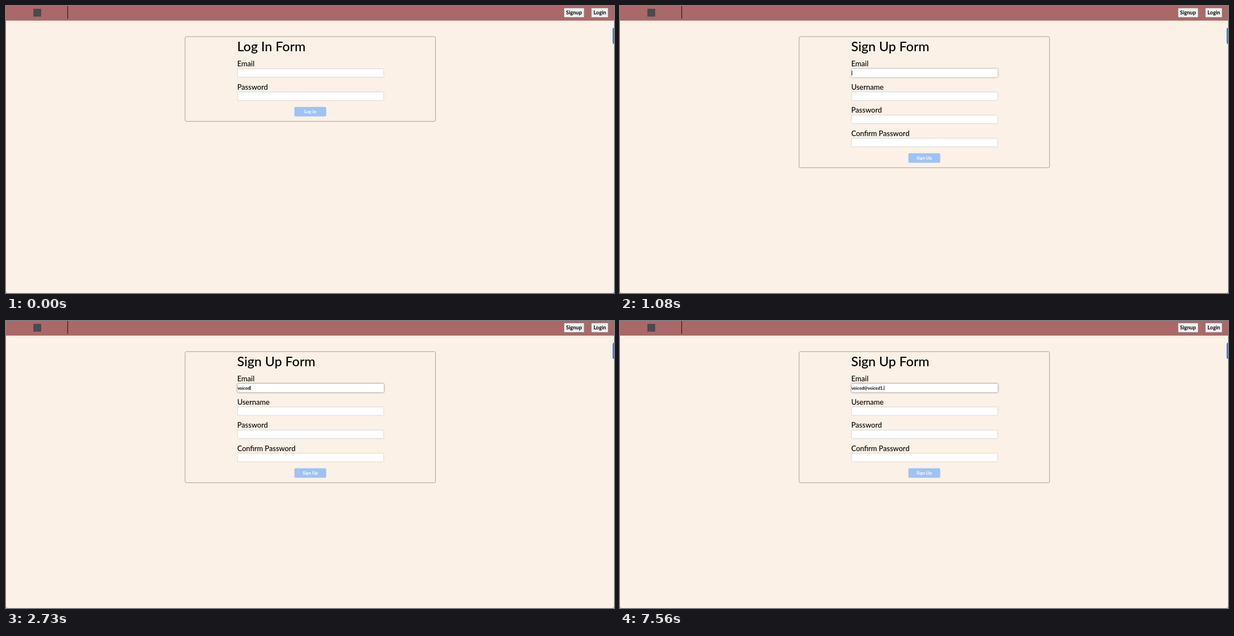
Write an HTML page that moves like this. It is 1089 px wide and 514 px high and loops after 8 s.

```html
<!DOCTYPE html>
<html lang="en">
<head>
<meta charset="utf-8">
<title>Sign up form</title>
<style>
  html, body { margin: 0; width: 100%; height: 100%; overflow: hidden; background: #fbf1e6; }
  svg { display: block; width: 1089px; height: 514px; font-family: Lato, sans-serif; }
  .title { font-size: 23.6px; font-weight: 500; }
  .label { font-size: 13px; font-weight: 500; }
  .nav { font-size: 9.4px; font-weight: 700; text-anchor: middle; }
  .submit { font-size: 8px; font-weight: 700; text-anchor: middle; fill: #fff; }
  .typed { font-size: 7.7px; font-weight: 700; }
  .item { font: 500 7.2px Inter, sans-serif; fill: #222; }
  .navbox { fill: #efefef; stroke: #8c7779; }
  .hover { fill: #dedede; }
  .field { fill: #fff; stroke: #dcd7d1; }
  .box { fill: none; stroke: #a59e97; }
  #focus { filter: drop-shadow(0 0 1.7px rgba(0, 0, 0, .6)); }
  #popup { filter: drop-shadow(0 .7px 1.2px rgba(0, 0, 0, .28)); }
</style>
</head>
<body>
<svg viewBox="0 0 1089 514">
  <rect width="1089" height="514" fill="#fbf1e6"/>
  <rect width="1089" height="26.2" fill="#ab6868"/>
  <rect x="49" y="5" width="14" height="14" fill="#4b4a4e"/>
  <path d="M110.5 0V23" stroke="#2a1c1c" stroke-width="1.2"/>
  <rect id="signupBtn" class="navbox" x="999.3" y="3.4" width="36.5" height="17.2"/>
  <rect class="navbox" x="1048.2" y="3.4" width="30.5" height="17.2"/>
  <text class="nav" x="1017.3" y="14.8">Signup</text>
  <text class="nav" x="1063.5" y="14.8">Login</text>
  <path d="M1089 39q-2.5 0 -2.5 3v23q0 3 2.5 3z" fill="#2f80ed"/>
  <path d="M0 511q0 3 3 3h-3zM1089 511q0 3 -3 3h3z" fill="#8a8580"/>

  <g id="login"></g>
  <g id="signup"></g>

  <rect id="focus" x="414.5" y="112.2" width="262.3" height="15.6" rx="1.5" fill="#fff"/>
  <text id="typed" class="typed" x="414.7" y="122.5"></text>
  <rect id="caret" y="116" width=".9" height="8"/>

  <g id="popup">
    <path d="M472 133H478L482 128.5L486.5 133H577.2q2 0 2 2V222.5q0 2 -2 2H472q-2 0 -2 -2V135q0 -2 2 -2z" fill="#fff"/>
    <text class="item" x="477" y="148.5">tovi34@in.example.edu</text>
    <text class="item" x="477" y="169">miravo.tel@example.com</text>
    <text class="item" x="477" y="189.5">nibbl@example.com</text>
    <path d="M470 199.3H579" stroke="#dcdcdc"/>
    <circle cx="481.5" cy="212.2" r="3.8" fill="#55585c"/>
    <text class="item" x="493" y="215" style="fill:#666">Manage...</text>
  </g>

  <g id="arrow" fill="#000" stroke="#fff" stroke-width="1.2">
    <path d="M0 0V17L4 13.5L7 20L10 18.7L7 12.3H12.3Z"/>
  </g>
  <g id="hand" fill="#fff" stroke="#000" stroke-width="1.4" stroke-linejoin="round" stroke-linecap="round">
    <path d="M-2 1.5Q-1 -1 2 1L5 9Q8 7 9 9Q12 7.5 12.5 10Q15 9.5 15 12.5V17Q15 20 13 23H4L-3 17Q-7 13 -6 11.5Q-4 10 1 13Z"/>
    <path d="M4.7 12.5V18M8 12.5V18M11.3 12.5V18"/>
  </g>
</svg>
<script>
const $ = id => document.getElementById(id);
const show = (id, on) => { $(id).style.display = on ? "" : "none"; };

function buildForm(id, title, labels, action) {
  const end = 124 + labels.length * 41.5;
  const rows = labels.map((name, i) => {
    const y = i * 41.5;
    return `<text class="label" x="414.2" y="${108 + y}">${name}</text>
      <rect class="field" x="414.7" y="${112.4 + y}" width="262" height="15.2" rx="2"/>`;
  });
  $(id).innerHTML = `
    <rect class="box" x="320.8" y="54.8" width="448.5" height="${end - 55.1}" rx="2.5"/>
    <text class="title" x="414" y="81.3">${title}</text>${rows.join("")}
    <rect x="516.5" y="${end - 26.3}" width="57" height="17" rx="2" fill="#9fc2f4"/>
    <text class="submit" x="545" y="${end - 15}">${action}</text>`;
}
buildForm("login", "Log In Form", ["Email", "Password"], "Log In");
buildForm("signup", "Sign Up Form", ["Email", "Username", "Password", "Confirm Password"], "Sign Up");

const LOOP = 8000;
const TEXT = "voiced@voiced1.";
// time of each keystroke
const KEYS = [2070, 2340, 2370, 2580, 2640, 2730, 4410, 4830, 4920, 5040, 5220, 5310, 5400, 7260, 7560];
// time, caret visible
const CARET = [[0, 0], [990, 1], [1530, 0], [1980, 1], [3180, 0], [3630, 1], [4080, 0],
  [4410, 1], [5850, 0], [6300, 1], [6750, 0], [7200, 1]];
// time, opacity of the focus ring
const FOCUS = [[0, 0], [990, .2], [1080, .55], [1110, .7], [1380, 1]];
// time, pointer shape, tip position
const POINTER = [[0, ""], [120, "arrow", 1002, 42], [150, "hand", 1022, 15], [180, "hand", 1017, 11],
  [600, "arrow", 968, 42], [630, "arrow", 815, 88], [660, "arrow", 634, 118], [690, ""]];

const at = (steps, t) => steps.filter(s => s[0] <= t).pop();

function draw(t) {
  const joined = t >= 390;
  show("login", !joined);
  show("signup", joined);

  const [, shape, x, y] = at(POINTER, t);
  for (const id of ["arrow", "hand"]) {
    show(id, id === shape);
    if (id === shape) $(id).setAttribute("transform", `translate(${x} ${y})`);
  }
  $("signupBtn").classList.toggle("hover", shape === "hand");

  $("focus").style.opacity = at(FOCUS, t)[1];
  show("popup", t >= 1110 && t < 2070);

  const typed = $("typed");
  typed.textContent = TEXT.slice(0, KEYS.filter(k => k <= t).length);
  const width = typed.textContent ? typed.getComputedTextLength() : 0;
  $("caret").setAttribute("x", 415 + width);
  show("caret", at(CARET, t)[1]);
}

const start = performance.now();
function tick(now) {
  draw(Math.max(0, now - start) % LOOP);
  requestAnimationFrame(tick);
}
draw(0);
requestAnimationFrame(tick);
</script>
</body>
</html>
```
